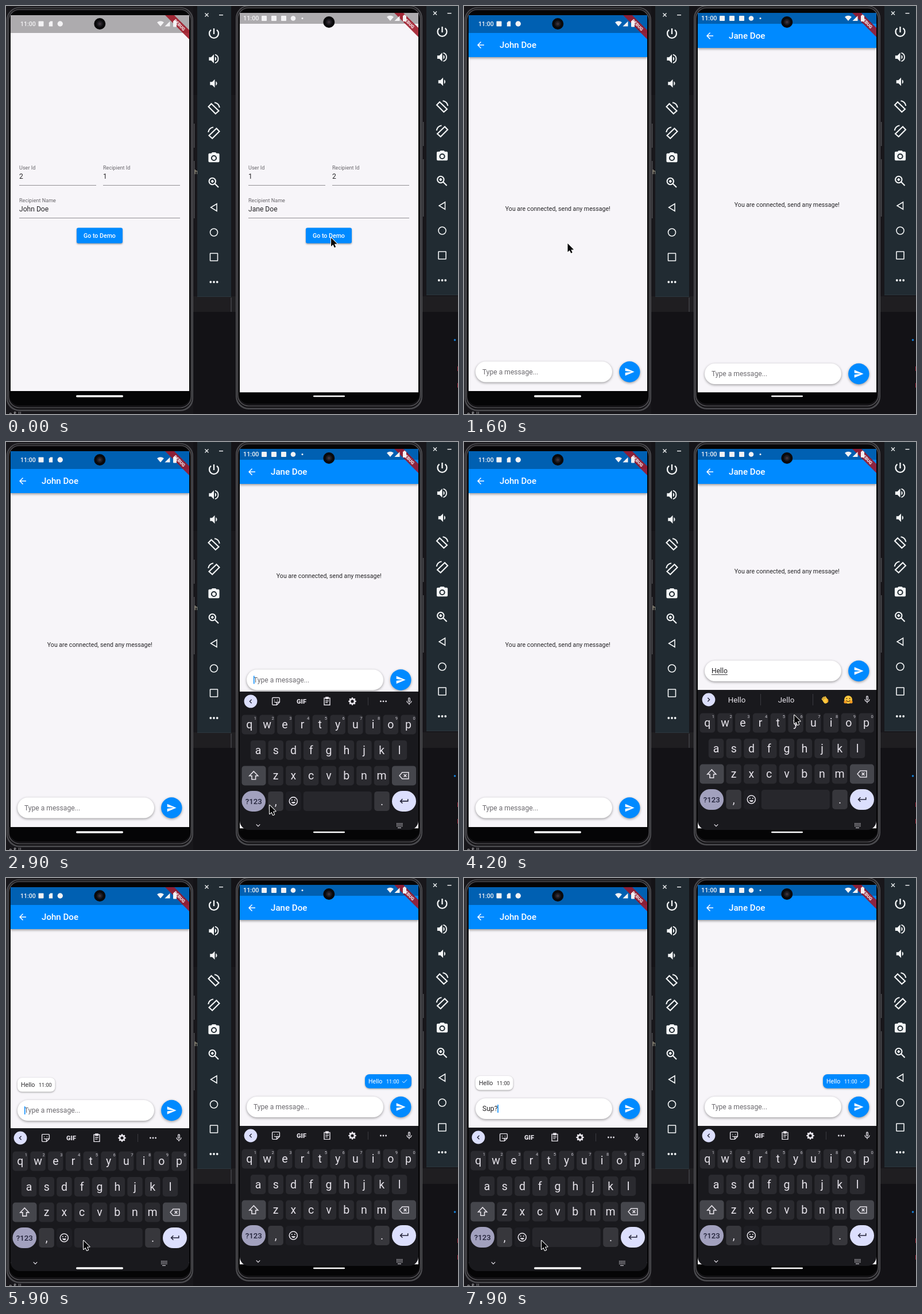
An HTML page with a canvas that plays this animation: 787 px wide and 711 px high, repeating every 8000 ms.

```html
<!DOCTYPE html>
<html lang="en">
<head>
<meta charset="utf-8">
<title>Chat demo</title>
<style>
html, body { margin: 0; width: 100%; height: 100%; overflow: hidden; background: #151418; }
canvas { display: block; width: 787px; height: 711px; }
</style>
</head>
<body>
<canvas id="stage" width="787" height="711"></canvas>
<script>
const c = document.getElementById('stage').getContext('2d');
const LOOP = 8000, STEP = 100;
const BLUE = '#008aff', PAPER = '#f7f5f9', KEY = '#2a2a2f', MOD = '#45464c', LILAC = '#dcdffd', INK = '#e6e3ea';

const phones = [
  { dx: 0, top: 16, bar: 47, nav: 671, msg: 353, inp: 637.5, up: 235.5, kb: 3, tx: 0,
    down: 51, mini: 275, navY: 671, pill: [122, 82, 3.4], edge: [2, 2, 325, 704], cam: 31,
    time: [25, 31, 10.6], wifi: 269, open: 1050, kbAt: 5520, inpAt: 5517, chatAt: 4700, mine: false,
    typed: [[5520, ''], [6900, 'S'], [7100, 'Su'], [7300, 'Sup'], [7600, 'Sup?']], blinkEnd: LOOP },
  { dx: 399, top: 12, bar: 31, nav: 673.5, msg: 346.5, inp: 641, up: 242, kb: 0, tx: 2,
    down: 40, mini: 286, navY: 668, pill: [136, 55, 2.6], edge: [2, -1, 325, 704], cam: 28,
    time: [14, 21.5, 10.8], wifi: 270, open: 100, kbAt: 2550, inpAt: 2600, chatAt: 4400, mine: true,
    typed: [[2550, ''], [3200, 'H'], [3300, 'He'], [3400, 'Hel'], [3500, 'Hell'], [3700, 'Hello'], [4400, '']], blinkEnd: LOOP }
];
const hints = { H: ['Hi', 'Hey'], He: ['Hey', 'Hello'], Hel: ['Hello', 'Help'], Hell: ['Hello', 'Hell'],
  Hello: ['Hello', 'Jello'], S: ['So', 'Sure'], Su: ['Sure', 'Sup'], Sup: ['Sup', 'Super'] };

// Pointer stops: time, x, y
const path = [[0, 566, 404], [250, 566, 404], [800, 191, 411], [900, 168, 404], [1500, 168, 404],
  [2300, 459, 633], [3700, 459, 633], [4200, 575, 476], [4400, 685, 400], [4750, 685, 400],
  [5400, 137, 627], [5500, 135, 632], [LOOP, 135, 632]];

const icons = {
  back: 'M20 11H7.8l5.6-5.6L12 4l-8 8 8 8 1.4-1.4L7.8 13H20z',
  send: 'M2 21L23 12 2 3V10l15 2-15 2z',
  power: 'M12 3v10M7 5.6a8 8 0 1 0 10 0',
  speaker: 'M3 9v6h4l5 5V4L7 9z',
  wave1: 'M14 8v8a4.5 4.5 0 0 0 0-8z',
  wave2: 'M14 4.3a8 8 0 0 1 0 15.4',
  rotate: 'M7.5 4.2L20.5 16.8 14.8 21.8 2.5 9.5zM13 2.2A10 10 0 0 1 21.8 11',
  camera: 'M9 2L7.2 4H4a2 2 0 0 0-2 2v12a2 2 0 0 0 2 2h16a2 2 0 0 0 2-2V6a2 2 0 0 0-2-2h-3.2L15 2z',
  zoom: 'M15 9.5a5.7 5.7 0 1 1-11.4 0a5.7 5.7 0 1 1 11.4 0M13.8 13.8L20 20M9.3 7v5M6.8 9.5h5',
  tri: 'M18 4.5v15L5.5 12z',
  sticker: 'M5 3h14a2 2 0 0 1 2 2v9l-7 7H5a2 2 0 0 1-2-2V5a2 2 0 0 1 2-2zM14 21v-5a2 2 0 0 1 2-2h5M8.5 8v2M15.5 8v2M8 13q3 3 6 .5',
  clip: 'M5 4h14v17H5zM9 2h6v4H9zM8 11h8M8 15h6',
  mic: 'M12 3a2 2 0 0 1 2 2v6a2 2 0 0 1-4 0V5a2 2 0 0 1 2-2zM6 11a6 6 0 0 0 12 0M12 17v4',
  shift: 'M12 3L3 12.5h5V20h8v-7.5h5z',
  erase: 'M8 5h14v14H8L2 12zM11.5 9l6 6M17.5 9l-6 6',
  enter: 'M21 7v5H4M8.5 7L3.5 12l5 5',
  left: 'M15 6l-6 6 6 6',
  down: 'M6 9l6 6 6-6',
  check: 'M3 12.5l6 6L21 6',
  card: 'M10 2h9v20H5V8z',
  wifi: 'M12 21L0 7q12-9 24 0z',
  signal: 'M2 22H22V2z',
  close: 'M4 4l16 16M20 4L4 20'
};
for (const k in icons) icons[k] = new Path2D(icons[k]);

function icon(name, x, y, size, color, lw, flip) {
  c.save();
  c.translate(x, y);
  c.scale(size / 24 * (flip ? -1 : 1), size / 24);
  c.translate(-12, -12);
  if (lw) { c.strokeStyle = color; c.lineWidth = lw; c.stroke(icons[name]); }
  else { c.fillStyle = color; c.fill(icons[name]); }
  c.restore();
}
function text(s, x, y, size, color, align = 'left', weight = 400) {
  c.font = `${weight} ${size}px Roboto, sans-serif`;
  c.textAlign = align;
  c.fillStyle = color;
  c.fillText(s, x, y + size * 0.355);
}
function rect(x, y, w, h, color) { c.fillStyle = color; c.fillRect(x, y, w, h); }
function box(x, y, w, h, r, color, lw) {
  c.beginPath();
  c.roundRect(x, y, w, h, r);
  if (lw) { c.strokeStyle = color; c.lineWidth = lw; c.stroke(); }
  else { c.fillStyle = color; c.fill(); }
}
function disc(x, y, r, color, lw) { box(x - r, y - r, 2 * r, 2 * r, r, color, lw); }
function dots(x, y, gap, r, color) { for (let i = -1; i < 2; i++) disc(x + i * gap, y, r, color); }
function shaded(blur, dy, draw) {
  c.save();
  c.shadowColor = 'rgba(0,0,0,.38)'; c.shadowBlur = blur; c.shadowOffsetY = dy;
  draw();
  c.restore();
}
const clamp = v => Math.max(0, Math.min(1, v));
const easeOut = v => 1 - (1 - clamp(v)) ** 3;
const smooth = v => v * v * (3 - 2 * v);

function backdrop() {
  rect(0, 0, 787, 711, '#18171b');
  rect(326, 0, 80, 155, '#141317');
  rect(326, 506, 461, 27, '#1f1e21');
  rect(326, 533, 461, 178, '#131216');
  rect(391.5, 508, 1, 25, '#55545a');
  text('h', 328, 289, 11, '#c9c3a8');
  text('e & ||', 5, 711, 10, '#bcbcbf');
  disc(781.5, 582, 1.8, '#1580d8');
  rect(786, 628, 1, 8, '#a02a3c');
  rect(786, 657, 1, 8, '#a02a3c');
}

function panel(x, dy, left, width, height) {
  const W = '#f4f6f7';
  rect(left, 0, width, height, '#212b32');
  rect(left, height - 1, width, 1, '#2d373d');
  icon('close', x - 12.5, 15.5 + dy, 9, W, 3.5);
  rect(x + 9, 15 + dy, 7, 1.4, W);
  icon('power', x, 48 + dy, 24, W, 2.3);
  icon('speaker', x, 92 + dy, 23, W);
  icon('wave1', x, 92 + dy, 23, W);
  icon('wave2', x, 92 + dy, 23, W, 2);
  icon('speaker', x + 1.5, 135 + dy, 22, W);
  icon('wave1', x + 1.5, 135 + dy, 22, W);
  icon('rotate', x, 178 + dy, 24, W, 2.1);
  icon('rotate', x, 221 + dy, 24, W, 2.1, true);
  icon('camera', x, 264.5 + dy, 23, W);
  disc(x, 265 + dy, 4.1, '#212b32', 2);
  icon('zoom', x, 308 + dy, 24, W, 2.1);
  icon('tri', x, 351 + dy, 20, W, 1.9);
  disc(x, 394.5 + dy, 6.5, W, 1.6);
  box(x - 6.5, 431 + dy, 13, 13, 0.5, W, 1.6);
  dots(x, 481 + dy, 5.7, 1.9, W);
}

function body(p) {
  const [x, y, w, h] = p.edge;
  box(x - 1, y, w, h, 22, '#4b4b4f');
  box(x + 1, y + 1.5, w - 4, h - 4, 21, '#151417');
  box(x + 2.5, y + 4, w - 7, h - 10, 19, '#626165', 1.2);
  box(x + 4, y + 6, w - 10, h - 16, 17, '#050506');
  for (const [a, b] of [[203, 42], [268, 100]]) rect(x + w, y + a, 1.3, b, '#57575b');
}

function form(p) {
  rect(8, p.top, 311, p.nav - p.top, PAPER);
  const L = '#69676c', V = '#232225';
  text('User Id', 23, 282, 9.08, L);
  text('Recipient Id', 169, 282, 9.08, L);
  text('Recipient Name', 23, 338.5, 9.08, L);
  text(p.mine ? '1' : '2', 23, 297, 12.1, V);
  text(p.mine ? '2' : '1', 169, 297, 12.1, V);
  text(p.mine ? 'Jane Doe' : 'John Doe', 23, 353.5, 12.1, V);
  rect(23, 312, 134, 1, '#918f94');
  rect(169, 312, 134, 1, '#918f94');
  rect(23, 369, 280, 1, '#918f94');
  shaded(3, 1.5, () => box(123, 386.5, 80, 27, 3, BLUE));
  text('Go to Demo', 163, 400, 10.6, '#fff', 'center', 500);
}

function current(p, t) {
  return p.typed.reduce((last, e) => e[0] <= t ? e : last, null);
}

function chat(p, t) {
  const lift = p.up * easeOut((t - p.inpAt) / 500), y = p.inp - lift;
  rect(8, p.top, 311, p.nav - p.top, PAPER);
  shaded(4, 1.5, () => rect(8, p.top, 311, p.bar + 42 - p.top, BLUE));
  icon('back', 29, p.bar + 21, 18, '#fff');
  text(p.mine ? 'Jane Doe' : 'John Doe', 62, p.bar + 21, 15.1, '#fff', 'left', 500);

  if (t < p.chatAt) {
    text('You are connected, send any message!', 163.3, p.msg - lift / 2, 10.6, '#262528', 'center');
  } else {
    const x = p.mine ? 226 : 20, b = y - 45, ink = p.mine ? '#fff' : '#2b2a2d';
    shaded(3, 1, () => box(x, b - 12, p.mine ? 81 : 65.5, 24.5, 8, p.mine ? BLUE : '#fff'));
    text('Hello', x + 6, b, 10.6, ink);
    text('11:00', x + 37, b + 0.5, 9.08, ink);
    if (p.mine) icon('check', x + 69, b, 10.5, '#fff', 2.2);
  }

  shaded(4, 1.5, () => box(20, y - 18, 238, 36, 18, '#fff'));
  shaded(4, 1.5, () => disc(288.3, y, 18.2, BLUE));
  icon('send', 288.3, y, 18.2, '#fff');

  const now = current(p, t), s = now ? now[1] : '';
  text(s || 'Type a message...', 32, y, 12.1, s ? '#232225' : '#6c6a6f');
  const w = s ? c.measureText(s).width : 0;
  if (s in hints) rect(32, y + 6, w, 0.9, '#232225');
  if (now && (t - now[0]) % 1000 < 500) rect(32 + w, y - 7, 1.5, 14, BLUE);
}

function strip(s, y) {
  disc(25, y, 11.4, LILAC);
  icon('left', 25, y, 13, '#24253a', 2.6, s in hints);
  icon('mic', 301, y, 16, INK, 2);
  if (s in hints) {
    const [a, b] = hints[s];
    text(a, 74, y + 0.5, 13.3, INK, 'center');
    text(b, 160, y + 0.5, 13.3, INK, 'center');
    rect(115, y - 10, 1, 20, '#3a3a40');
    rect(206, y - 10, 1, 20, '#3a3a40');
    if (s === 'Hello') { hand(227, y); hug(268, y); }
    return;
  }
  icon('sticker', 69, y, 17, INK, 2);
  text('GIF', 113.5, y, 11, INK, 'center', 900);
  icon('clip', 158, y, 17, INK, 2);
  disc(202, y, 4, INK, 2.8);
  for (let i = 0; i < 8; i++) {
    const a = i * Math.PI / 4;
    disc(202 + 5.6 * Math.cos(a), y + 5.6 * Math.sin(a), 1.3, INK);
  }
  rect(229, y - 7, 1, 14, '#3a3a40');
  dots(256, y, 4.6, 1.4, INK);
}
function hand(x, y) {
  c.save();
  c.translate(x, y);
  c.rotate(-0.6);
  box(-4, -1, 8.5, 8, 3.5, '#ffc83d');
  for (let i = 0; i < 4; i++) box(-4 + i * 2.2, -6 + Math.abs(i - 1.5), 1.9, 8, 1, '#ffc83d');
  c.rotate(0.7);
  box(4, -1.5, 2.2, 6, 1, '#f5a623');
  c.restore();
}
function hug(x, y) {
  disc(x, y, 7, '#ffc83d');
  disc(x - 2.6, y - 2, 1, '#5b3a12');
  disc(x + 2.6, y - 2, 1, '#5b3a12');
  c.beginPath(); c.arc(x, y, 3.4, 0.3, 2.84);
  c.strokeStyle = '#5b3a12'; c.lineWidth = 1.2; c.stroke();
  disc(x - 5, y + 4, 2.6, '#f59a23');
  disc(x + 5, y + 4, 2.6, '#f59a23');
}

function keyboard(p, t) {
  const off = 265 * (1 - easeOut((t - p.kbAt) / 450));
  if (t < p.kbAt) return;
  const y = p.kb + off, now = current(p, t);
  c.save();
  c.beginPath();
  c.roundRect(8, p.top, 311, 676 - p.top + p.kb * 3, [0, 0, 16, 16]);
  c.clip();
  rect(8, 432 + y, 311, 300, '#19191d');
  c.save();
  c.translate(p.tx, 0);
  strip(now ? now[1] : '', 449 + y);
  c.restore();

  const cap = (ch, x, cy, w = 26.5, color = KEY) => {
    box(x - w / 2, cy - 17, w, 34, 5, color);
    text(ch, x, cy, 19.5, INK, 'center');
  };
  const rows = [['qwertyuiop', 24.8, 489.5], ['asdfghjkl', 40, 534], ['zxcvbnm', 70.6, 578.5]];
  for (const [letters, x0, cy] of rows) {
    [...letters].forEach((ch, i) => {
      const x = x0 + i * 30.75;
      cap(ch, x, cy + y);
      if (cy < 500) text((i + 1) % 10, x + 10, cy - 11 + y, 7.5, '#c8c6ce', 'center');
    });
  }
  const r3 = 578.5 + y, r4 = 623 + y;
  box(11.5, r3 - 17, 42, 34, 5, MOD);
  icon('shift', 32.3, r3, 20, INK, 1.9);
  box(273, r3 - 17, 42, 34, 5, MOD);
  icon('erase', 294, r3, 19, INK, 1.9);
  box(11.5, r4 - 18, 41.5, 36, 18, '#a2a1be');
  text('?123', 32.3, r4, 13.2, '#22233a', 'center', 500);
  cap(',', 70.6, r4, 26.5, '#37373c');
  box(88, r4 - 17, 27, 34, 5, '#1f1f24');
  disc(101.3, r4, 7, INK, 1.6);
  disc(98.8, r4 - 2, 1.1, INK);
  disc(103.8, r4 - 2, 1.1, INK);
  c.beginPath(); c.arc(101.3, r4 + 0.5, 3.6, 0.2, 2.94); c.fillStyle = INK; c.fill();
  box(118.8, r4 - 17, 119, 34, 5, '#27272c');
  cap('.', 255.5, r4, 26.5, '#37373c');
  box(273, r4 - 18, 42, 36, 18, LILAC);
  icon('enter', 294, r4, 18, '#24253a', 2.2);

  icon('down', p.down, p.navY, 13, INK, 2.4);
  for (let i = 0; i < 15; i++) rect(p.mini - 5 + i % 5 * 2.3, p.navY - 4 + Math.floor(i / 5) * 2.4, 1.3, 1.4, '#c8c6ce');
  rect(p.mini - 3, p.navY + 3.8, 6, 1.2, '#c8c6ce');
  c.restore();
}

function banner(p) {
  c.save();
  c.beginPath(); c.rect(8, p.top, 311, 60); c.clip();
  c.translate(302, p.top + 17);
  c.rotate(Math.PI / 4);
  rect(-40, -5.6, 80, 11.2, 'rgba(160,22,38,.88)');
  text('DEBUG', 0, 0, 7.8, '#f6e9eb', 'center', 900);
  c.restore();
}

function status(p) {
  const [x, y, size] = p.time, W = '#f3f2f4', w = p.wifi;
  rect(8, p.top, 311, p.bar - p.top, 'rgba(0,0,0,.3)');
  banner(p);
  text('11:00', x, y, size, W, 'left', 500);
  if (p.mine) {
    for (let i = 0; i < 3; i++) box(46 + i * 17, y - 4.5, 9, 9, 1, W);
    disc(101, y, 4.3, W);
    disc(117, y, 1.5, W);
  } else {
    box(56.5, y - 4.5, 9, 9, 1, W);
    icon('card', 78, y, 11, W);
    disc(94.3, y, 4.7, W);
  }
  icon('wifi', w, y, 12, W);
  icon('signal', w + 12, y, 11, W);
  box(w + 22, y - 5, 6, 10.5, 1, W);
  rect(w + 23.7, y - 6.2, 2.6, 2, W);
  disc(163.3, p.cam, 10, '#0a090b');
  disc(163.3, p.cam, 5.4, '#1c1b20');
  disc(163.3, p.cam, 2.6, '#3a3038');
}

function phone(p, t) {
  c.save();
  c.translate(p.dx, 0);
  body(p);
  c.save();
  c.beginPath(); c.rect(8, p.top, 311, p.nav - p.top); c.clip();
  const shown = clamp((t - p.open) / 300);
  if (shown < 1) form(p);
  if (shown > 0) {
    const k = 0.85 + 0.15 * easeOut(shown);
    c.globalAlpha = clamp(shown * 1.6);
    c.translate(163.5, 344);
    c.scale(k, k);
    c.translate(-163.5, -344);
    chat(p, t);
  }
  c.restore();
  keyboard(p, t);
  status(p);
  const [x, w, h] = p.pill;
  box(x, 680 - h / 2, w, h, h / 2, '#fff');
  c.restore();
}

function pointer(t) {
  let i = 0;
  while (i < path.length - 2 && path[i + 1][0] <= t) i++;
  const [t0, x0, y0] = path[i], [t1, x1, y1] = path[i + 1], k = smooth((t - t0) / (t1 - t0));
  c.save();
  c.translate(x0 + (x1 - x0) * k, y0 + (y1 - y0) * k);
  c.beginPath();
  for (const [x, y] of [[0, 0], [0, 15], [3.4, 11.8], [5.8, 17], [8.2, 16], [5.9, 10.8], [10.6, 10.6]]) c.lineTo(x, y);
  c.closePath();
  c.lineJoin = 'round';
  c.lineWidth = 2; c.strokeStyle = '#fff'; c.stroke();
  c.fillStyle = '#08080a'; c.fill();
  c.restore();
}

function draw() {
  const t = Math.floor(performance.now() % LOOP / STEP) * STEP;
  backdrop();
  panel(362, 0, 333, 59, 507);
  panel(759.5, -3, 732, 55, 504);
  phones.forEach(p => phone(p, t));
  pointer(t);
  requestAnimationFrame(draw);
}
draw();
</script>
</body>
</html>
```
